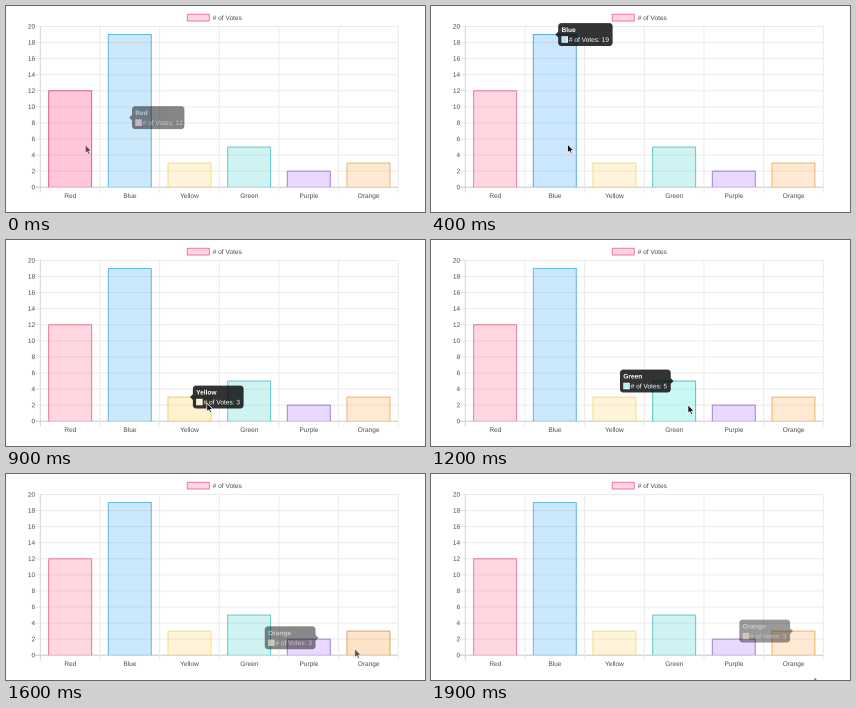
Write a matplotlib script that moves like this. It is 419 by 206 pixels and loops after 2 s.

```python
import numpy as np
import matplotlib.pyplot as plt
from matplotlib.animation import FuncAnimation
from matplotlib.patches import PathPatch, Polygon, Rectangle
from matplotlib.path import Path
from matplotlib.textpath import TextPath

W, H, DPI = 419, 206, 64
FRAMES, STEP = 20, 100
LEFT, RIGHT, TOP, BASE = 34.3, 392.3, 20.5, 181.2
SLOT = (RIGHT - LEFT) / 6
UNIT = (BASE - TOP) / 20
BAR = 0.72 * SLOT
FONT = 6.55
INK = "#4d4d4d"

NAMES = ["Red", "Blue", "Yellow", "Green", "Purple", "Orange"]
VALUES = [12, 19, 3, 5, 2, 3]
FILLS = ["#ff638b", "#37abf7", "#ffd76b", "#43cfcf", "#af6bff", "#ffab4f"]
HOVER_FILLS = ["#ff2367", "#339fff", "#ffcf3f", "#2fe7df", "#9f57ff", "#f79727"]
EDGES = ["#ea7a9d", "#5fb5ea", "#f8dc7c", "#62c8c8", "#a57fd8", "#efb562"]
HOVER_EDGES = ["#e2608a", "#55abe4", "#f0d263", "#55c2be", "#996fcf", "#e0a653"]
FILL_ALPHA = 0.25

# Times (ms) at which the pointer enters a bar, or leaves it (None).
EVENTS = [(0, 0), (60, None), (130, 1), (563, None), (710, 2), (940, None),
          (1000, 3), (1240, None), (1330, 4), (1555, None), (1590, 5),
          (1865, None)]
FADE = 220
START = np.array([126, 100.2, 52.4, 0.6])  # tooltip left, top, width, opacity

# Pointer path: time, x, y
PATH = np.array([(0, 79.3, 138.8), (100, 95, 138.3), (400, 136.6, 138.2),
                 (700, 180.6, 156.8), (900, 200.8, 163), (1200, 257, 164.8),
                 (1600, 348.8, 174.8), (1800, 373, 181.5), (1900, 383.2, 203)])
ARROW = 1.07 * np.array([(0, 0), (0, 8), (1.8, 6.4), (3, 9.1), (4.3, 8.5),
                         (3.2, 5.9), (5.6, 5.7)])

PAD, GAP, CARET, RADIUS, TIP_H = 3.3, 3.4, 2.8, 3.2, 22.9


def px(v):
    return v * 72 / DPI


fig = plt.figure(figsize=(W / DPI, H / DPI), dpi=DPI, facecolor="white")
ax = fig.add_axes([0, 0, 1, 1])
ax.set_xlim(0, W)
ax.set_ylim(H, 0)
ax.axis("off")


def text_path(x, y, s, align=0, weight="normal"):
    """Text with capitals centred on y; align 0 left, 0.5 centre, 1 right."""
    prop = {"family": "Liberation Sans", "weight": weight}
    path = TextPath((0, 0), s, size=FONT, prop=prop)
    shift = align * path.get_extents().x1
    verts = path.vertices * (1, -1) + (x - shift, y + 0.36 * FONT)
    return Path(verts, path.codes)


def label(x, y, s, align=0, color=INK, z=4):
    patch = PathPatch(text_path(x, y, s, align), facecolor=color,
                      edgecolor="none", lw=0, snap=False, zorder=z)
    return ax.add_patch(patch)


def line(xs, ys, color, z=1):
    return ax.plot(xs, ys, color=color, lw=px(1), zorder=z, snap=False,
                   solid_capstyle="butt", solid_joinstyle="miter")[0]


def rect(x, y, w, h, color, z, alpha=1):
    return ax.add_patch(Rectangle((x, y), w, h, facecolor=color, alpha=alpha,
                                  edgecolor="none", snap=False, zorder=z))


def center(i):
    return LEFT + SLOT * (i + 0.5)


def bar_top(i):
    return BASE - VALUES[i] * UNIT


# Grid, axis labels and legend
for k in range(11):
    y = BASE - 2 * k * UNIT
    line([29, RIGHT], [y, y], "#c8c8c8" if k == 0 else "#ebebeb")
    label(28.9, y - 0.2, str(2 * k), 1)
for k in range(7):
    x = LEFT + k * SLOT
    line([x, x], [TOP, BASE + 5.4], "#d4d4d4" if k == 0 else "#ebebeb")
rect(181.3, 8.3, 22, 6.7, FILLS[0], 2, FILL_ALPHA)
line([181.3, 203.3, 203.3, 181.3, 181.3], [8.3, 8.3, 15, 15, 8.3], EDGES[0], 3)
label(206.7, 11.7, "# of Votes")

bars, outlines = [], []
for i, name in enumerate(NAMES):
    x0, x1, y = center(i) - BAR / 2, center(i) + BAR / 2, bar_top(i)
    bars.append(rect(x0, y, BAR, BASE - y, FILLS[i], 2, FILL_ALPHA))
    outlines.append(line([x0, x0, x1, x1], [BASE, y, y, BASE], EDGES[i], 3))
    label(center(i), 189.6, name, 0.5)

# Tooltip and pointer
bubble = ax.add_patch(Polygon([(0, 0), (1, 0), (1, 1)], facecolor="black",
                              edgecolor="none", zorder=5))
swatch_back = rect(0, 0, 6.5, 6.5, "white", 6)
swatch = rect(0, 0, 5.3, 5.3, "white", 7)
title = label(0, 0, NAMES[0], color="white", z=8)
body = label(0, 0, NAMES[0], color="white", z=8)
pointer = ax.add_patch(Polygon(ARROW, facecolor="#111111", edgecolor="white",
                               lw=px(0.7), zorder=10))


def points_left(i):
    return i < 3


def tip_home(i):
    """Resting left, top, width and opacity of a bar's tooltip."""
    ems = 6.17 if VALUES[i] > 9 else 5.61
    w = ems * FONT + 7.4 + 2 * PAD
    x = center(i) + GAP if points_left(i) else center(i) - GAP - w
    return np.array([x, bar_top(i) - TIP_H / 2, w, 1.0])


def tip_state(t):
    """Tooltip box and opacity, shown bar and hovered bar at time t."""
    state, shown, hovered = START, 0, None
    ends = [e[0] for e in EVENTS[1:]] + [FRAMES * STEP]
    for (begin, hovered), end in zip(EVENTS, ends):
        if hovered is None:
            goal = state * (1, 1, 1, 0)
        else:
            shown, goal = hovered, tip_home(hovered)
        u = min(1, (min(t, end) - begin) / FADE)
        state = state + (goal - state) * (1 - (1 - u) ** 4)
        if t < end:
            break
    return state, shown, hovered


def bubble_outline(x, y, w, left):
    pts = []
    corners = [(x + w - RADIUS, y + RADIUS, -90),
               (x + w - RADIUS, y + TIP_H - RADIUS, 0),
               (x + RADIUS, y + TIP_H - RADIUS, 90),
               (x + RADIUS, y + RADIUS, 180)]
    mid = y + TIP_H / 2
    for k, (cx, cy, a) in enumerate(corners):
        for d in np.radians(np.linspace(a, a + 90, 7)):
            pts.append((cx + RADIUS * np.cos(d), cy + RADIUS * np.sin(d)))
        if k == 0 and not left:
            pts += [(x + w, mid - CARET), (x + w + CARET, mid),
                    (x + w, mid + CARET)]
        if k == 2 and left:
            pts += [(x, mid + CARET), (x - CARET, mid), (x, mid - CARET)]
    return pts


def update(n):
    t = n * STEP
    (x, y, w, a), i, hovered = tip_state(t)

    for k in range(6):
        on = k == hovered
        bars[k].set_facecolor((HOVER_FILLS if on else FILLS)[k])
        outlines[k].set_color((HOVER_EDGES if on else EDGES)[k])

    a = float(np.clip(a, 0, 1))
    bubble.set_xy(bubble_outline(x, y, w, points_left(i)))
    bubble.set_alpha(0.8 * a)
    left = x + PAD
    row1 = y + PAD + FONT / 2
    row2 = row1 + FONT + PAD
    title.set_path(text_path(left, row1, NAMES[i], weight="bold"))
    body.set_path(text_path(left + 7.4, row2, f"# of Votes: {VALUES[i]}"))
    swatch_back.set_xy((left, row2 - 3.25))
    swatch.set_xy((left + 0.6, row2 - 2.65))
    swatch.set_facecolor(FILLS[i])
    swatch.set_alpha(0.35 * a)
    for part in (title, body, swatch_back):
        part.set_alpha(a)

    tip = [np.interp(t, PATH[:, 0], PATH[:, c]) for c in (1, 2)]
    pointer.set_xy(ARROW + tip)
    pointer.set_alpha(0.6 + 0.4 * a ** 3)
    return [*bars, *outlines, bubble, swatch_back, swatch, title, body, pointer]


anim = FuncAnimation(fig, update, frames=FRAMES, interval=STEP,
                     init_func=lambda: update(0), repeat=True,
                     repeat_delay=0, blit=False)
plt.show()
```
